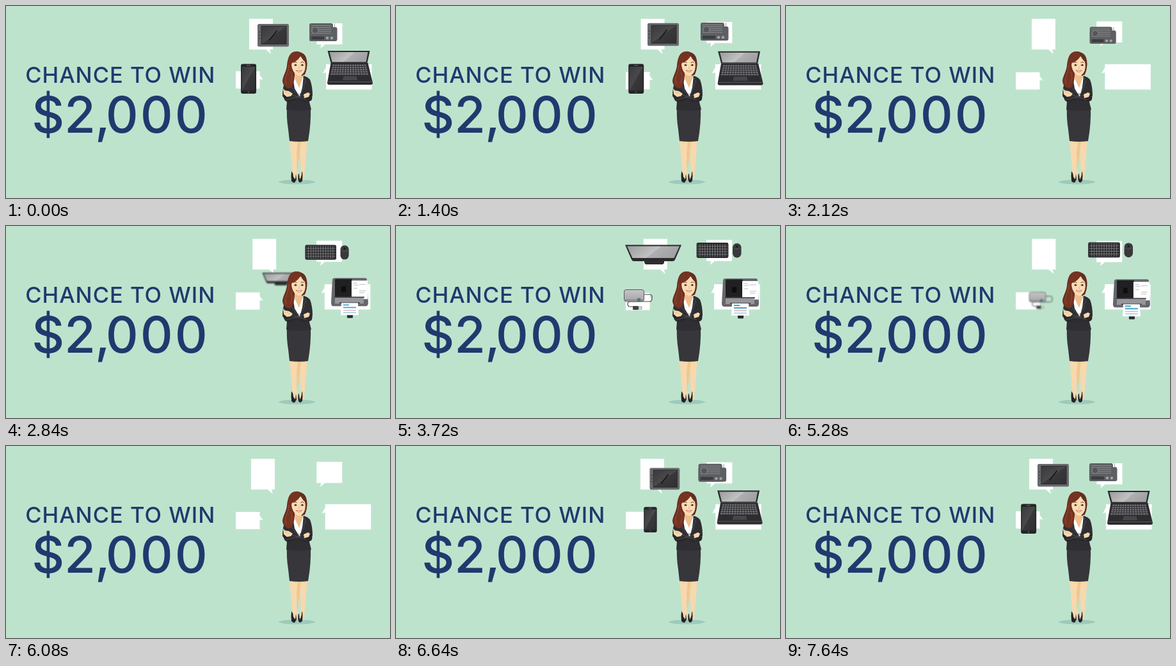
Write an HTML page that moves like this. It is 600 px wide and 300 px high and loops after 7680 ms.

```html
<!DOCTYPE html>
<html lang="en">
<head>
<meta charset="utf-8">
<title>Chance to win</title>
<style>
html, body { margin: 0; width: 100%; height: 100%; overflow: hidden; background: #bee3cd; }
svg { display: block; width: 100%; height: 100%; }
text { font-family: Inter, "Open Sans", sans-serif; font-weight: 500; fill: #1f3a6e; text-anchor: middle; }
</style>
</head>
<body>
<svg viewBox="0 0 600 300">
<defs>
  <linearGradient id="glass" x2="1" y2="1">
    <stop offset="0" stop-color="#3a3a3d"/><stop offset=".5" stop-color="#4a4a4d"/>
    <stop offset=".5" stop-color="#39393b"/><stop offset="1" stop-color="#303032"/>
  </linearGradient>
  <linearGradient id="panel" x2="1" y2=".3">
    <stop offset="0" stop-color="#9b9b9d"/><stop offset=".6" stop-color="#c3c3c4"/>
    <stop offset=".6" stop-color="#b0b0b2"/><stop offset="1" stop-color="#a2a2a4"/>
  </linearGradient>
  <linearGradient id="metal" y2="1" x2="0">
    <stop offset="0" stop-color="#c6c6c7"/><stop offset="1" stop-color="#a3a3a5"/>
  </linearGradient>
</defs>
<rect width="600" height="300" fill="#bee3cd"/>
<text x="178.700" y="120" font-size="34.500" letter-spacing="1">CHANCE TO WIN</text>
<text x="179" y="197.500" font-size="79">$2<tspan dx="-1">,</tspan><tspan dx="-7" letter-spacing="3">000</tspan></text>

<g fill="#fff">
  <path id="b1" d="M0 0h37v48h-5l2 7-8-7H0z"/>
  <path id="b2" d="M0 0h40v33H13l-7 6 1-6H0z"/>
  <path id="b3" d="M0 0h37.500v6l5 7-5-1v15H0z"/>
  <path id="b4" d="M0 0h71.500v39.500H0V13l-5 1 5-9z"/>
</g>

<!-- devices, each centred on its own origin -->
<g id="tablet">
  <rect x="-24.500" y="-17.500" width="49" height="35.500" rx="2.500" fill="#68696d"/>
  <rect x="-18.500" y="-14" width="39" height="28" fill="url(#glass)" stroke="#2c2c2e"/>
  <path d="M-22.500-5h2M-22.500 0h2M-22.500 5h2" stroke="#3d3d40" stroke-width="1.500"/>
  <path d="M-6 8L6-7" stroke="#19191a" stroke-width="1.800"/>
</g>
<g id="radio">
  <path d="M17.500-13.500V8" stroke="#98999c"/>
  <rect x="-22" y="-14" width="37" height="28" rx="3" fill="#5e5f62"/>
  <rect x="-22" y="-8" width="43.500" height="22" rx="3" fill="#5e5f62"/>
  <path d="M-19-10.500h31M-19-7.500h31M-19-4.500h31M-19-1.500h31M-19 1.500h31" stroke="#88898b"/>
  <circle cx="-13" cy="-3" r="5" fill="#55565a" stroke="#88898c"/>
  <rect x="-19" y="6.500" width="20" height="5" fill="#3c3d40"/>
  <circle cx="6" cy="9" r="2.200" fill="#a3a4a7"/><circle cx="13" cy="9" r="2.200" fill="#a3a4a7"/>
</g>
<g id="phone">
  <rect x="-12" y="-23" width="24" height="46.500" rx="3" fill="#252527"/>
  <rect x="-10.500" y="-18.500" width="21" height="37" fill="url(#glass)"/>
  <path d="M-3-20.700h6" stroke="#6c6c70"/><circle cy="21" r="1.300" fill="#55555a"/>
</g>
<g id="laptop">
  <path d="M-35-26.500h66l-4 19h-57z" fill="#2b2b2d"/>
  <path d="M-32-24.500h60l-3 15.500h-53z" fill="url(#panel)"/>
  <path d="M-30-7.500h58l7.500 31q0 3-3 3h-65q-3 0-3-3z" fill="#2d2d30"/>
  <path d="M-35 22h70" stroke="#59595d"/>
  <path d="M-10 13h20l1.500 6.500h-23z" fill="#47474b"/>
</g>
<g id="monitor">
  <path d="M-14 8h31v4l-2 2.500h-27l-2-2.500z" fill="#2f2f31"/>
  <path d="M-44-16h88l-10 23q-1 2.500-4 2.500h-60q-3 0-4-2.500z" fill="#2b2b2d"/>
  <path d="M-41-14h82l-8.500 18.500h-65z" fill="url(#panel)"/>
</g>
<g id="keyboard">
  <rect x="-35" y="-11" width="48" height="22" rx="1.500" fill="#77777a" stroke="#2b2b2d" stroke-width="1.800"/>
  <rect x="20.500" y="-11" width="13.500" height="22.500" rx="6.500" fill="#39393b"/>
  <path d="M21.500-3q6 3 11.500 0M27.200-11v9" fill="none" stroke="#5d5d60" stroke-width=".7"/>
  <rect x="26.200" y="-8" width="2" height="4" rx="1" fill="#161617"/>
</g>
<g id="printer">
  <path d="M-23-32h47q3 0 3 3l2 36q0 5-4 5h-50q-4 0-4-5l2-36q0-3 4-3z" fill="#66676c"/>
  <rect x="-23" y="-30.500" width="27" height="28" rx="1.500" fill="#202022"/>
  <rect x="-13" y="-19" width="7" height="9" rx="2" fill="#0e0e0f"/>
  <path d="M3-28h25l.5 29H3z" fill="#fff"/>
  <path d="M6-24h6M6-21h8M15-22h10M6-16h6M15-12h10M15-9h8" stroke="#b4b5b8" stroke-width=".9"/>
  <path d="M-23-2h45v10h-45z" fill="#96979b"/>
  <path d="M-24-2h47M-16 7h32" stroke="#37383b" stroke-width="1.600"/>
  <rect x="-4" y="24" width="9" height="6.500" rx="1" fill="#29292b"/>
  <path d="M-13 7h26l1 19h-28z" fill="#fff"/>
  <path d="M-10 10h9M-10 14h20" stroke="#42a3cf" stroke-width="1.800"/>
  <path d="M-10 18.500h20" stroke="#d08e94" stroke-width=".9"/>
  <path d="M-10 22h20" stroke="#6ea6cb" stroke-width=".9"/>
</g>
<g id="drive">
  <path d="M11-8h8q4 0 4 3v4q0 4-4 4h-29q-5 0-5 4t4 4h6" fill="none" stroke="#4a4a4d" stroke-width="1.200"/>
  <rect x="-20.500" y="-15.500" width="31" height="18.500" rx="3.500" fill="url(#metal)" stroke="#59595c"/>
  <path d="M-19 .5h28" stroke="#77787b"/>
  <rect x="-7" y="10" width="9" height="6" rx="1" fill="#434346"/>
  <path d="M2 11h5v4H2z" fill="#e2e2e3" stroke="#77787b" stroke-width=".7"/>
  <circle cx="2.500" cy=".5" r="3" fill="#54757c"/>
</g>

<g id="woman">
  <ellipse cx="454.500" cy="275" rx="28.500" ry="3.500" fill="#9dcaba"/>
  <path d="M443 208l5 56q1 8 4 9l3-4-1-19 2-26 3-12 2 58q1 5 5-2l5-60z" fill="#f8d8ac"/>
  <path d="M456 210l-2 20 1 28q4-28 6-48z" fill="#efc891"/>
  <path d="M446 258q3 6 7 4l1 9-3 5q-4 0-5-3-1-7 0-15zM457 262q4 3 6-4 1 8 0 15-2 4-5 2-3-4-1-13z" fill="#232225"/>
  <path d="M448 259l1 8 3 4 1-9zM458 263l1 8q3-4 3-11z" fill="#f8d8ac"/>
  <path d="M439 157q-1 18 2 36l2 18q15 2 29 0 5-28 4-54z" fill="#37363a"/>
  <path d="M455 71C443 70 440 82 439 93 438 103 432 110 432 118q1 10 12 11 7-4 6-14l17-8q4-9 3-19-1-15-15-17z" fill="#662d20"/>
  <path d="M451 101h11v9l5 4-9 17-9-17 2-4z" fill="#efc08f"/>
  <path d="M450 111l8 17 6-17 3 3-2 28h-17l-2-27z" fill="#fff"/>
  <path d="M448 110q-10 2-12 7-4 11-4 24l7 7-1 14q19 3 39 0l-4-16 6-6q0-15-4-25-3-4-10-6l-2 18-4 15-8-13z" fill="#2f2e32"/>
  <path d="M448 111l-4 8 4 3-2 4 11 15M464 110l5 9-4 3 1 4-7 14" fill="none" stroke="#545358" stroke-width=".8"/>
  <path d="M433 138q1 12 8 12l29-7 3-6-27 1zM478 138q2 10-4 11-14 2-31-9l4-4 25 4z" fill="#29282c"/>
  <path d="M437 147l32-9M445 138l25 9" stroke="#545358" stroke-width=".8" fill="none"/>
  <path d="M433 129l3 3 6 1 6 4-3 4-6 1-5-4zM465 138l7-3 3 2-2 5-7 2z" fill="#f8d8ac"/>
  <path d="M435 134l8 3" stroke="#d6a677" stroke-width=".6"/>
  <path d="M446 90C445 75 469 74 469 90 469 101 463 109 458 109 451 108 446 99 446 90z" fill="#fbdcb3"/>
  <path d="M462 75q-5 11-15 14-3 3 0 12 5 10 3 16-2 9-7 12-9-2-10-9 0-7 5-13 2-6 2-14 0-12 6-18 9-8 17 0z" fill="#753322"/>
  <path d="M458 73q4 10 9 14 2 8-1 17l3-4q3-11 0-19-3-9-11-8z" fill="#662d20"/>
  <path d="M442 92q-1 10-4 16t0 14M445 103q4 8-1 18" fill="none" stroke="#954a32"/>
  <path d="M449.500 88.500q3-2 5 0M460.500 88.500q3-2 5 0" fill="none" stroke="#662d20" stroke-width=".9"/>
  <path d="M450 92.500q2.500-2.500 4.500 0-2 1.500-4.500 0zM460.500 92.500q2.500-2.500 4.500 0-2 1.500-4.500 0z" fill="#fff" stroke="#392b29" stroke-width=".6"/>
  <circle cx="452.500" cy="92.300" r="1.200" fill="#35241f"/><circle cx="463" cy="92.300" r="1.200" fill="#35241f"/>
  <path d="M458 94l-.8 3.500h2" fill="none" stroke="#dda680" stroke-width=".7"/>
  <path d="M453 100.500q5 1.500 9.500 0-4.500 5.500-9.500 0z" fill="#fff" stroke="#c75850" stroke-width=".8"/>
</g>
</svg>
<script>
const LOOP = 7680, HUB = { x: 455, y: 120 };
const get = id => document.getElementById(id);

function addKeys(id, rows, cols, [x, y, w, h, flare], color) {
  let d = '';
  for (let r = 0; r < rows; r++) {
    const grow = flare * r / rows, step = (w + 2 * grow) / cols;
    for (let c = 0; c < cols; c++) {
      d += `M${x - grow + c * step} ${y + r * h / rows}h${step - 1}v${h / rows - 1}h${1 - step}z`;
    }
  }
  const path = document.createElementNS('http://www.w3.org/2000/svg', 'path');
  path.setAttribute('d', d);
  path.setAttribute('fill', color);
  get(id).append(path);
}
addKeys('laptop', 5, 14, [-27, -5, 53, 17, 4], '#707075');
addKeys('keyboard', 5, 12, [-34, -10, 47, 21, 0], '#29292b');

// id, start x and y, x and y shift at half loop
const bubbles = [
  ['b1', 380, 20, 7, 0], ['b2', 485.5, 27, -.5, -5.5],
  ['b3', 359, 102, 0, 2.5], ['b4', 500, 91, -3, 0]
];

// id, x, y, x and y drift per second, time of that position, entry, exit
const devices = [
  ['laptop', 537.5, 96.5, .4, .6, 0, -1600, 1810],
  ['radio', 496, 41, 1.4, -.8, 0, -1470, 2000],
  ['tablet', 417.5, 45.5, 0, -.9, 0, -1280, 1480],
  ['phone', 379, 113.5, -2.7, 0, 0, -1200, 1624],
  ['printer', 538, 114, 1.2, .8, 3720, 2440, 5290],
  ['keyboard', 505.5, 38, 1.6, -.4, 3720, 2570, 5480],
  ['monitor', 402, 45.5, .3, -.3, 3720, 2760, 4960],
  ['drive', 377, 115, .3, 0, 3720, 2840, 5104]
];

const clamp = v => Math.max(0, Math.min(1, v));
const begin = performance.now();

function draw(now) {
  const t = Math.max(0, now - begin) % LOOP;
  const sway = 1 - Math.abs(1 - 2 * t / LOOP);
  for (const [id, x, y, dx, dy] of bubbles) {
    get(id).setAttribute('transform', `translate(${x + dx * sway} ${y + dy * sway})`);
  }
  for (const [id, x, y, vx, vy, ref, enter, leave] of devices) {
    const u = enter < 0 && t > LOOP / 2 ? t - LOOP : t;
    const a = 1 - clamp((u - enter) / 400), b = clamp((u - leave) / 280);
    const out = a ** 3 + b ** 3, scale = 1 - .7 * out;
    const s = (u - ref) / 1000, px = x + vx * s, py = y + vy * s;
    const el = get(id);
    el.style.display = out >= 1 ? 'none' : '';
    el.setAttribute('transform',
      `translate(${px + (HUB.x - px) * out} ${py + (HUB.y - py) * out}) scale(${scale})`);
    const blur = 2.5 * (a * a + b * b);
    el.style.filter = blur > .05 ? `blur(${blur}px)` : '';
  }
  requestAnimationFrame(draw);
}
requestAnimationFrame(draw);
</script>
</body>
</html>
```
